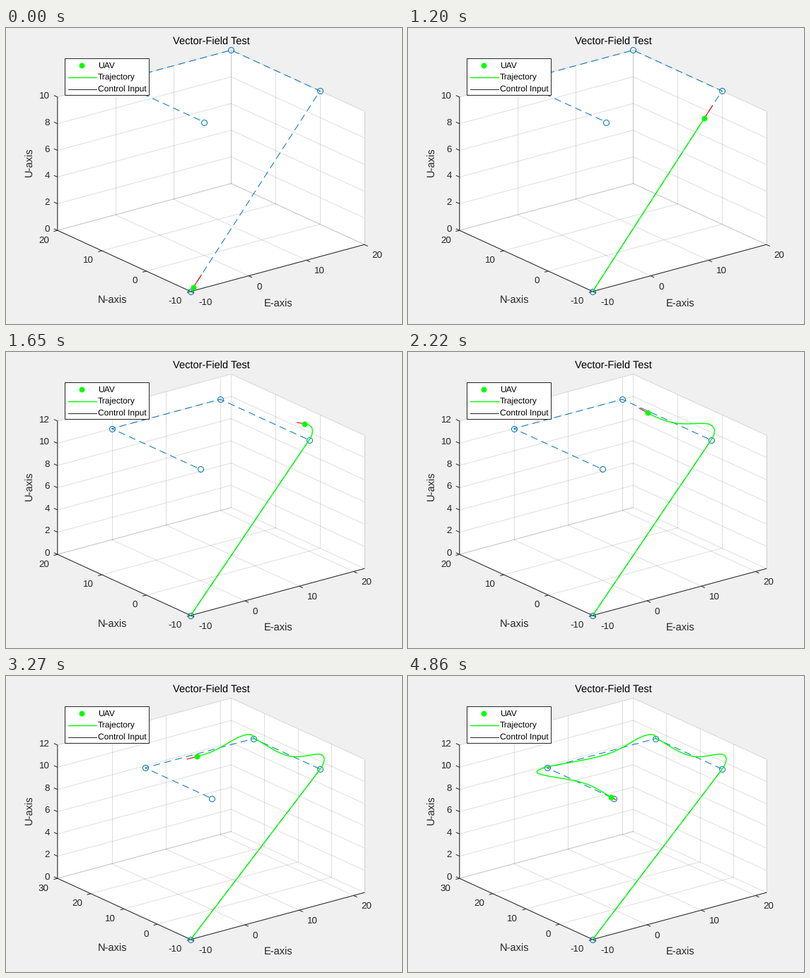
Animation, 560 px wide and 420 px high, one loop 4890 ms. Source, as a matplotlib script:

```python
import numpy as np
import matplotlib.pyplot as plt
from matplotlib.animation import FuncAnimation
from matplotlib.collections import LineCollection
from matplotlib.patches import Polygon, Rectangle

W, H, DPI = 560, 420, 100
FRAMES, STEP_MS = 163, 30
PT = 72 / DPI  # points per pixel
INK = "#262626"
BLUE = "#0072BD"
GREEN = "#00ff00"

plt.rcParams["font.family"] = "Liberation Sans"
plt.rcParams["text.hinting"] = "none"

# Axes box on screen: the view is turned 37.5 degrees and raised 30
FRONT = np.array([261.2, 373.8])
E_DIR = np.array([245.6, -66.5])
N_DIR = np.array([-188.4, -86.65])
U_DIR = np.array([0.0, -189.2])

WAYPOINTS = np.array([[-10, -10, 0], [20, 0, 10], [20, 20, 10],
                      [0, 20, 10], [0, 0, 10]], float)


def unit(v):
    return v / np.linalg.norm(v)


def swing(t, size, half, decay):
    """Damped swing past a corner; crosses zero every half steps."""
    t = np.maximum(t, 0)
    return size * np.exp(-t / decay) * np.sin(np.pi * t / half)


def flight():
    """Positions at every step, from one step before the loop begins."""
    t = np.arange(-1, FRAMES)[:, None]
    speed = 0.7
    climb = WAYPOINTS[1] - WAYPOINTS[0]
    pos = WAYPOINTS[0] + unit(climb) * speed * (t + 1)
    start = np.linalg.norm(climb) / speed - 1

    # After each corner: cruise speed, distance lost in the turn, recovery time
    starts = []
    legs = [(0.63, 3.1, 5), (0.63, 5.3, 5), (0.6, 4.1, 8)]
    for here, there, (cruise, lost, ease) in zip(WAYPOINTS[1:], WAYPOINTS[2:], legs):
        starts.append(start)
        dt = np.maximum(t - start, 0)
        along = cruise * dt - lost * (1 - np.exp(-dt / ease))
        pos = np.where(t < start, pos, here + unit(there - here) * along)
        start += (np.linalg.norm(there - here) + lost) / cruise

    first, second, third = (t[:, 0] - s for s in starts)
    pos[:, 0] += swing(first, 4.58, 30, 9.5) - swing(third, 4.55, 20, 13.6)
    pos[:, 1] += swing(second, 2.95, 18.3, 26)
    pos[:, 2] += swing(first, 1.34, 16.5, 15.3)
    return pos


track = flight()
velocity = np.gradient(track, axis=0)


def limits(k):
    """Upper E, N and U limits at step k."""
    e = 20 if k < 44 else 30 if 47 <= k < 55 else 22
    n = 20 if k < 80 else 22 if k < 85 else 30
    u = 10 if k < 44 else 12
    return e, n, u


def project(pts, lim):
    pts = np.atleast_2d(np.asarray(pts, float))
    e, n, u = lim
    return (FRONT + np.outer((pts[:, 0] + 10) / (e + 10), E_DIR)
            + np.outer((pts[:, 1] + 10) / (n + 10), N_DIR)
            + np.outer(pts[:, 2] / u, U_DIR))


fig = plt.figure(figsize=(W / 100, H / 100), dpi=DPI, facecolor="#f0f0f0")
ax = fig.add_axes([0, 0, 1, 1])
ax.set_xlim(0, W)
ax.set_ylim(H, 0)
ax.set_axis_off()


def label(x, y, text, size, ha="center", color=INK, **kw):
    """Text whose capitals are centred on y."""
    return ax.text(x, y + 0.36 * size, text, fontsize=size * PT, ha=ha,
                   va="baseline", color=color, **kw)


def line(color, width, **kw):
    return ax.plot([], [], color=color, lw=width * PT, **kw)[0]


left, right, back = FRONT + N_DIR, FRONT + E_DIR, FRONT + N_DIR + E_DIR
ax.add_patch(Polygon([left, FRONT, right, right + U_DIR, back + U_DIR, left + U_DIR],
                     fc="white", ec="none", zorder=0))
grid = LineCollection([], colors=[(0.15, 0.15, 0.15, 0.15)], linewidths=PT, zorder=1)
ticks = LineCollection([], colors=INK, linewidths=PT, zorder=2)
ax.add_collection(grid)
ax.add_collection(ticks)
ax.plot(*zip(left + U_DIR, left, FRONT, right), color=INK, lw=PT, zorder=2)

DOT = dict(ls="none", marker="o", mew=0.7 * PT, ms=7.2 * PT)
route = line(BLUE, 1, ls=(0, (10, 6)), dash_capstyle="butt", zorder=3)
stops = line(BLUE, 1, ls="none", marker="o", ms=8 * PT, mfc="none", mew=PT, zorder=3)
trail = line(GREEN, 1.4, zorder=4)
control = line("red", 1.1, zorder=5)
uav = line(GREEN, 1, zorder=6, **DOT)

label(290, 18.7, "Vector-Field Test", 14.67, color="black")
label(150.5, 386, "N-axis", 14.67)
label(385, 391, "E-axis", 14.67)
ax.text(38, 190.5, "U-axis", fontsize=14.67 * PT, color=INK, rotation=90,
        rotation_mode="anchor", ha="center", va="baseline")

# Legend
ax.add_patch(Rectangle((83, 43), 119, 52, fc="white", ec=INK, lw=PT, zorder=8))
ax.plot([107], [52.8], color=GREEN, zorder=9, **DOT)
ax.plot([88, 128], [70, 70], color=GREEN, lw=1.4 * PT, zorder=9)
ax.plot([88, 128], [87, 87], color=INK, lw=PT, zorder=9)
for row, name in enumerate(("UAV", "Trajectory", "Control Input")):
    label(130, 52.5 + 17 * row, name, 12, "left", "black", zorder=9)

TICK_PX = 13.33
e_labels = [label(0, 0, "", TICK_PX, "left") for _ in range(5)]
n_labels = [label(0, 0, "", TICK_PX, "right") for _ in range(5)]
u_labels = [label(0, 0, "", TICK_PX, "right") for _ in range(7)]


def place(labels, values, spots, dx, dy):
    for i, text in enumerate(labels):
        text.set_visible(i < len(values))
        if i < len(values):
            text.set_text(str(values[i]))
            text.set_position((spots[i][0] + dx, spots[i][1] + dy + 0.36 * TICK_PX))


def draw_axes(lim):
    e1, n1, u1 = lim
    es, ns, us = range(-10, e1 + 1, 10), range(-10, n1 + 1, 10), range(0, u1 + 1, 2)
    seg = []
    for e in es:
        seg += [[(e, -10, 0), (e, n1, 0)], [(e, n1, 0), (e, n1, u1)]]
    for n in ns:
        seg += [[(-10, n, 0), (e1, n, 0)], [(e1, n, 0), (e1, n, u1)]]
    for u in us:
        seg += [[(-10, n1, u), (e1, n1, u)], [(e1, n1, u), (e1, -10, u)]]
    grid.set_segments([project(s, lim) for s in seg])

    e_at = project([(e, -10, 0) for e in es], lim)
    n_at = project([(-10, n, 0) for n in ns], lim)
    u_at = project([(-10, n1, u) for u in us], lim)
    marks = []
    for spots, way in ((e_at, -N_DIR), (n_at, -E_DIR), (u_at, N_DIR)):
        marks += [[p, p + 5.5 * unit(way)] for p in spots]
    ticks.set_segments(marks)
    place(e_labels, es, e_at, 11, 14)
    place(n_labels, ns, n_at, -12, 12.5)
    place(u_labels, us, u_at, -11, -3)


def update(k):
    lim = limits(k)
    draw_axes(lim)
    path = project(WAYPOINTS, lim)
    route.set_data(*path.T)
    stops.set_data(*path.T)
    pos = track[k + 1]
    trail.set_data(*project(track[:k + 2], lim).T)
    control.set_data(*project([pos, pos + 2.9 * velocity[k + 1]], lim).T)
    uav.set_data(*project(pos, lim).T)
    return []


anim = FuncAnimation(fig, update, frames=FRAMES, interval=STEP_MS,
                     init_func=lambda: [], repeat=True, repeat_delay=0, blit=False)
plt.show()
```
